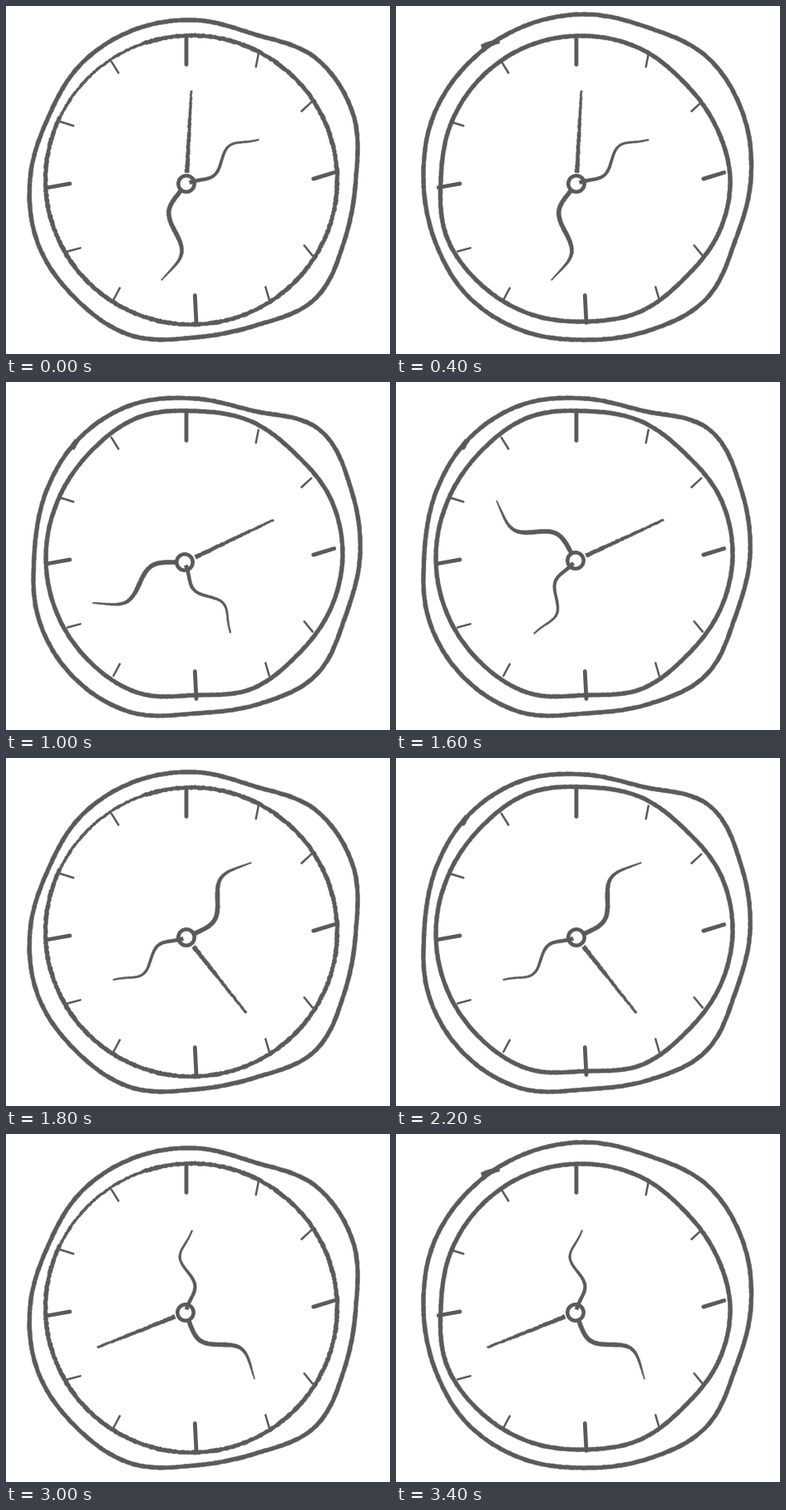
Recreate the animation shown at these times as an HTML page. Size 462 by 419 pixels, loop 3.6 s.

```html
<!DOCTYPE html>
<html lang="en">
<head>
<meta charset="utf-8">
<title>Sketched clock</title>
<style>
html, body { margin: 0; width: 100%; height: 100%; overflow: hidden; background: #fff; }
svg { display: block; width: 100vw; height: 100vh; }
</style>
</head>
<body>
<svg id="stage" viewBox="0 0 462 419"></svg>
<script>
const INK = '#5a5a5a';
const STEP = 200;
const HOLD = 600;
const LOOP = 3600;
const RIM_ORDER = 'ABCACBACBACBABCABC';
const TAU = Math.PI * 2;

const stage = document.getElementById('stage');

function add(parent, tag, attrs = {}) {
  const el = document.createElementNS('http://www.w3.org/2000/svg', tag);
  for (const k in attrs) el.setAttribute(k, attrs[k]);
  parent.appendChild(el);
  return el;
}

let seed = 7;
function jitter(size) {
  seed = (seed * 16807) % 2147483647;
  return (seed / 2147483647 - 0.5) * 2 * size;
}

// Point at a clockwise bearing from twelve o'clock
const polar = (cx, cy, r, a) => [cx + r * Math.sin(a), cy - r * Math.cos(a)];
const rad = deg => deg * TAU / 360;

// Filled stroke along curve(t), t from 0 to 1, with width(t) and rough edges
function brush(parent, curve, width, rough, steps) {
  const left = [], right = [];
  for (let i = 0; i <= steps; i++) {
    const t = i / steps;
    const [x, y] = curve(t), a = curve(t - 0.002), b = curve(t + 0.002);
    const dx = b[0] - a[0], dy = b[1] - a[1], len = Math.hypot(dx, dy);
    const side = s => {
      const w = s * (width(t) / 2 + jitter(rough)) / len;
      return `${(x - dy * w).toFixed(1)} ${(y + dx * w).toFixed(1)}`;
    };
    left.push(side(1));
    right.unshift(side(-1));
  }
  const d = 'M' + left.concat(right).join('L') + 'Z';
  add(parent, 'path', { d, fill: INK, stroke: INK, 'stroke-width': 0.6, 'stroke-linejoin': 'round' });
}

// Closed outline with radii given at even bearings
function wobbly(radii) {
  const n = radii.length;
  return t => {
    const u = ((t + 1) % 1) * n, i = Math.floor(u), f = u - i;
    const [a, b, c, d] = [-1, 0, 1, 2].map(k => radii[(i + k + n) % n]);
    const r = b + 0.5 * f * (c - a + f * (2 * a - 5 * b + 4 * c - d + f * (3 * (b - c) + d - a)));
    return polar(228, 208, r, t * TAU);
  };
}

const ellipse = (cx, cy, rx, ry) => t => [cx + rx * Math.sin(t * TAU), cy - ry * Math.cos(t * TAU)];
const segment = (x1, y1, x2, y2) => t => [x1 + (x2 - x1) * t, y1 + (y2 - y1) * t];

const rims = {
  A: {
    outer: wobbly([191, 188, 205, 205, 193, 194, 204, 191, 191, 204, 204, 205, 199, 192, 195, 194]),
    inner: ellipse(223, 209.5, 175.5, 174),
    width: t => t > 0.82 && t < 0.95 ? 3 : 4.7,
    rough: 0.55
  },
  B: {
    outer: wobbly([188, 187, 212, 203, 198, 195, 205, 195, 191, 205, 208, 204, 194, 195, 198, 196]),
    inner: wobbly([173, 174, 171, 176, 177, 175, 172, 175, 169, 180, 181, 181, 180, 178, 177, 179]),
    blot: segment(79, 80, 85, 71),
    width: () => 4.8,
    rough: 0.2
  },
  C: {
    outer: wobbly([198, 197, 207, 205, 199, 195, 205, 198, 194, 198, 200, 196, 195, 198, 198, 198]),
    inner: wobbly([172, 170, 166, 169, 174, 173, 169, 173, 172, 176, 179, 181, 174, 175, 175, 174]),
    blot: segment(103, 49, 124, 42),
    width: () => 4.8,
    rough: 0.25
  }
};

function drawRim({ outer, inner, blot, width, rough }) {
  const g = add(stage, 'g');
  brush(g, outer, () => 4.8, 0.25, 500);
  brush(g, inner, width, rough, 500);
  if (blot) brush(g, blot, () => 6, 0.6, 8);
  return g;
}

// Degrees by which each hour mark is shifted and turned by the unsteady hand
const SHIFT = [-2, -2, -3, -3, 2, -3, -2, 3, 0, -3, -6, -4];
const TURN = [0, -19, -13, -17, 21, 14, -3, -2, 15, -10, -13, -2];

function drawMark(hour) {
  const major = hour % 3 === 0;
  const length = hour % 6 === 0 ? 33 : major ? 26 : 16;
  const [x1, y1] = polar(223, 209.5, 172, rad(hour * 30 + SHIFT[hour]));
  const [x2, y2] = polar(x1, y1, -length, rad(hour * 30 + TURN[hour]));
  add(stage, 'line', {
    x1, y1, x2, y2, stroke: INK, 'stroke-width': major ? 4.8 : 2.5, 'stroke-linecap': 'round'
  });
}

// Hand from hub to tip, bent sideways by a sum of sines
function hand([x, y], [tx, ty], from, size, bend) {
  const dx = tx - x, dy = ty - y, len = Math.hypot(dx, dy);
  return t => {
    const u = from + (1 - from) * t;
    const s = (size * Math.sin(TAU * u) - 2 * Math.sin(TAU * u / 2) - bend * Math.sin(TAU * 2 * u)) / len;
    return [x + dx * u - dy * s, y + dy * u + dx * s];
  };
}

const poses = [
  { hub: [217, 214], thick: [187, 330], thin: [304, 161], straight: [223, 102] },
  { hub: [215, 217], thick: [104, 266], thin: [270, 302], straight: [322, 166] },
  { hub: [216, 215], thick: [121, 143], thin: [166, 303], straight: [322, 166] },
  { hub: [217, 216], thick: [295, 126], thin: [129, 267], straight: [289, 307] },
  { hub: [217, 215], thick: [333, 250], thin: [117, 202], straight: [239, 328] },
  { hub: [216, 215], thick: [299, 295], thin: [224, 116], straight: [110, 257] }
];

function drawPose({ hub, thick, thin, straight }) {
  const g = add(stage, 'g');
  const [cx, cy] = hub;
  const start = hub.map((v, i) => v + (straight[i] - v) * 0.12);
  brush(g, hand(hub, thick, 0.08, 13.3, 2), t => 5 - 3.8 * Math.max(0, t - 0.5) * 2, 0.15, 80);
  brush(g, segment(...start, ...straight), t => 4.9 - 2.5 * t, 0.45, 60);
  add(g, 'circle', { cx, cy, r: 9.7, fill: '#fff', stroke: INK, 'stroke-width': 4.5 });
  brush(g, hand(hub, thin, 0.04, 9.5, 2.6), t => 4.3 - 2.6 * t, 0.12, 70);
  return g;
}

const rimLayers = {};
for (const key in rims) rimLayers[key] = drawRim(rims[key]);
SHIFT.forEach((_, hour) => drawMark(hour));
const poseLayers = poses.map(drawPose);

const show = (el, on) => el.setAttribute('visibility', on ? 'visible' : 'hidden');

function render(ms) {
  const t = ms % LOOP;
  const rim = RIM_ORDER[Math.floor(t / STEP)];
  const pose = Math.floor(t / HOLD);
  for (const key in rimLayers) show(rimLayers[key], key === rim);
  poseLayers.forEach((el, i) => show(el, i === pose));
}

function tick() {
  render(performance.now());
  requestAnimationFrame(tick);
}
render(0);
requestAnimationFrame(tick);
</script>
</body>
</html>
```
